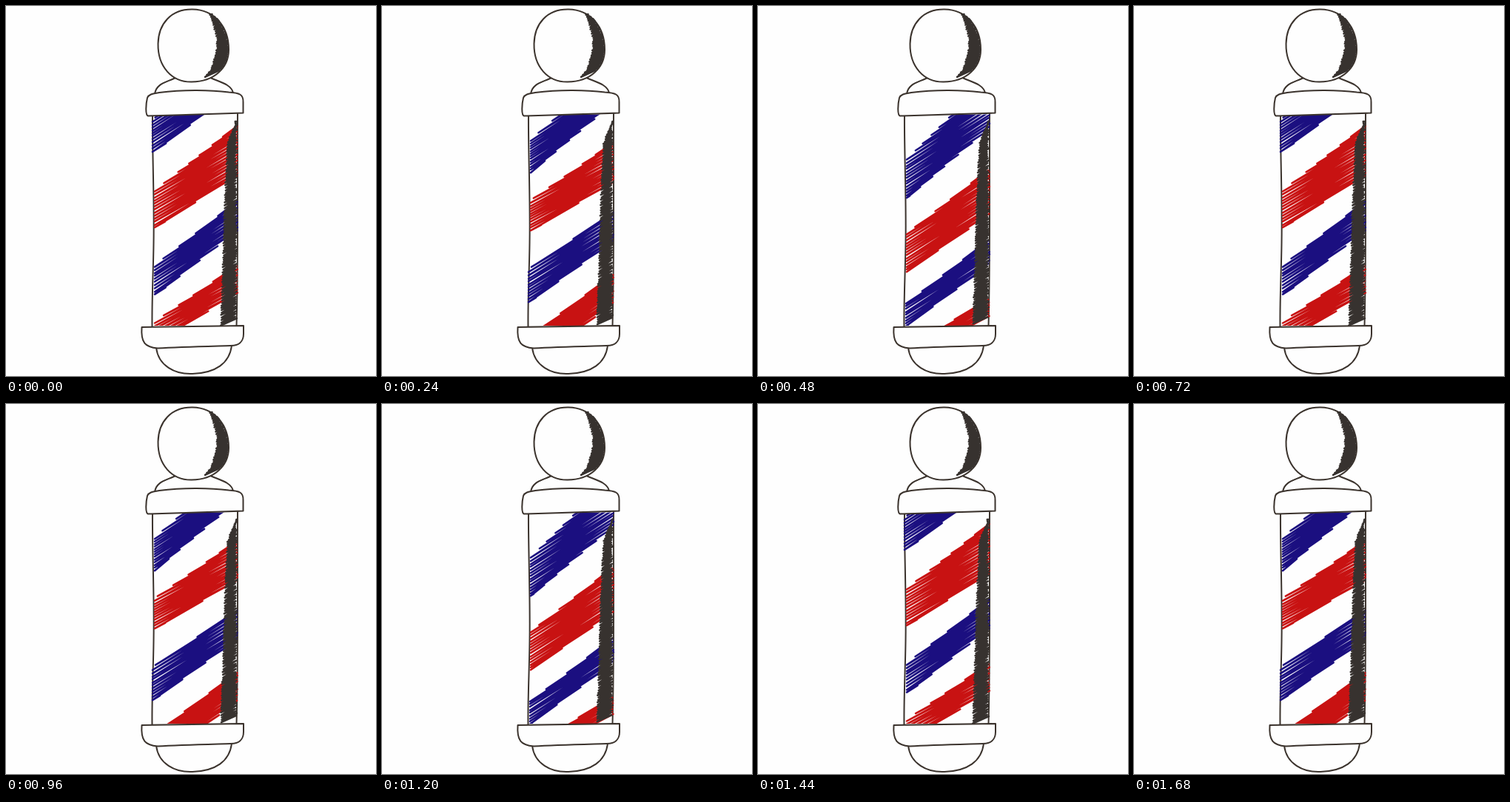
Recreate the animation shown at these times as an HTML page. Size 500 by 500 pixels, loop 1880 ms.

```html
<!DOCTYPE html>
<html lang="en">
<head>
<meta charset="utf-8">
<title>Barber pole</title>
<style>
  html, body { margin: 0; width: 100%; height: 100%; overflow: hidden; background: #fefefe; }
  svg { display: block; width: 100%; height: 100%; }
  path { fill: none; stroke-linecap: round; stroke-linejoin: round; }
  .ink { stroke: #3b332d; stroke-width: 2; }
  .body { fill: #fefefe; }
</style>
</head>
<body>
<svg viewBox="0 0 500 500">
  <defs>
    <clipPath id="tube"><rect x="195" y="146.5" width="120" height="285.5"/></clipPath>
  </defs>
  <path class="ink" d="M198 149 C197.500 190 200.500 260 199.500 320 C199 360 197 400 197.500 433"/>
  <path class="ink" d="M313 146 C312.500 220 314 340 311.500 432"/>
  <g id="poses"></g>
  <path class="ink body" d="M229 97 C218 103 203 104 201 119 L307 118 C305 105 286 102 274 96"/>
  <path class="ink body" d="M252 4.500 C223 4 206 24 205.500 51 C205 82 224 103 251 102.500 C281 102 301 84 301 59 C301 27 281 5 252 4.500 Z"/>
  <path class="ink body" d="M191 124 C193 119 199 118.500 207 117 C238 113 275 113 301 116.500 C315 117.500 321 119 320.500 130 L320.500 144.500 C285 146 235 147 192 148.500 C188 148 189 132 191 124 Z"/>
  <path class="ink body" d="M203 462 C206 486 228 498 252 497 C283 496 302 483 305 459"/>
  <path class="ink body" d="M183.500 434 L321 432 L321 443 C321 454 314 459 304 459 C272 460 235 461 205 462.500 C188 461 182 455 183.500 434 Z"/>
  <g id="ball"></g>
</svg>
<script>
const BLUE = '#1b0f80', RED = '#c81212', DARK = '#37322f';
const LEFT = 200, SPAN = 113, STEP = 240, LOOP = 1880;

// Stripe: colour, top and bottom at the left wall, top and bottom at the right wall, left overhang
const poses = [
  [[BLUE, 152, 198, 64, 112, 3], [RED, 250, 301, 161, 229, 0],
   [BLUE, 351, 393, 263, 303, 0], [RED, 427, 456, 350, 389, 0]],
  [[BLUE, 181, 226, 84, 131, 0], [RED, 263, 305, 184, 238, 0],
   [BLUE, 354, 400, 278, 318, 3], [RED, 446, 492, 362, 400, 0]],
  [[BLUE, 208, 261, 97, 165, 0], [RED, 308, 360, 220, 282, 0],
   [BLUE, 402, 433, 315, 350, 1], [RED, 463, 485, 395, 420, 0]]
];

// Edges as [y, x]
const tubeEdge = [[153, 313], [163, 308], [174, 303], [186, 299], [220, 297], [270, 295], [340, 293], [432, 290]];
const ballIn = [[10, 276], [30, 282], [45, 286], [60, 285], [75, 281], [85, 278], [92, 272], [98, 267]];
const ballOut = [[10, 277], [18, 286], [30, 294], [45, 299], [60, 300], [72, 298], [80, 295], [90, 285], [98, 270]];

function random(seed) {
  return () => (seed = (seed * 16807) % 2147483647) / 2147483647;
}

function edgeAt(points, y) {
  if (y <= points[0][0]) return points[0][1];
  for (let i = 1; i < points.length; i++) {
    const [y0, x0] = points[i - 1], [y1, x1] = points[i];
    if (y <= y1) return x0 + (x1 - x0) * (y - y0) / (y1 - y0);
  }
  return points[points.length - 1][1];
}

function add(tag, parent, attrs) {
  const el = document.createElementNS('http://www.w3.org/2000/svg', tag);
  for (const key in attrs) el.setAttribute(key, attrs[key]);
  return parent.appendChild(el);
}

function scribble(parent, points, color, width) {
  const d = 'M' + points.map(p => p.map(v => v.toFixed(1)).join(' ')).join('L');
  add('path', parent, { d, stroke: color, 'stroke-width': width });
}

function stripe(parent, [color, lt, lb, rt, rb, over], rnd) {
  const kt = (rt - lt) / SPAN, kb = (rb - lb) / SPAN;
  const m = Math.max(-0.62, Math.max(kt, kb) + 0.08);
  const points = [];
  for (let c = rt - m * SPAN + 1; c < lb; c += 3.2 + rnd() * 1.6) {
    const u0 = Math.max(1 - over, (lt - c) / (m - kt));
    const u1 = Math.min(SPAN - rnd() * 2, (lb - c) / (m - kb));
    if (u1 > u0) points.push([LEFT + u0, c + m * u0], [LEFT + u1, c + m * u1]);
  }
  scribble(parent, points, color, 2.5);
}

function tubeShade(parent, rnd) {
  const points = [];
  for (let y = 156; y < 432; y += 2.8 + rnd() * 1.2) {
    const x = edgeAt(tubeEdge, y) + rnd() * 1.5;
    const end = 309.5 + rnd() * 2.5;
    points.push([Math.min(x, 311.5), y], [end, y - 0.45 * Math.max(0, end - x)]);
  }
  scribble(parent, points, DARK, 2.6);
}

function ballShade(parent, rnd) {
  const points = [];
  for (let y = 12; y < 98; y += 2.5 + rnd()) {
    const x = edgeAt(ballIn, y) + rnd() * 2 - 1;
    const top = Math.max(11, y - 0.55 * Math.max(0, edgeAt(ballOut, y - 6) - x));
    points.push([x, y], [edgeAt(ballOut, top), top]);
  }
  scribble(parent, points, DARK, 2.6);
}

const holder = document.getElementById('poses');
const groups = poses.map((stripes, i) => {
  const rnd = random(4177 + i * 911);
  const group = add('g', holder, { 'clip-path': 'url(#tube)' });
  stripes.forEach(s => stripe(group, s, rnd));
  tubeShade(group, rnd);
  return group;
});
ballShade(document.getElementById('ball'), random(731));

let start;
function draw(now) {
  start ??= now;
  const pose = Math.floor(((now - start) % LOOP) / STEP) % groups.length;
  groups.forEach((g, i) => g.setAttribute('visibility', i === pose ? 'visible' : 'hidden'));
  requestAnimationFrame(draw);
}
requestAnimationFrame(draw);
</script>
</body>
</html>
```
